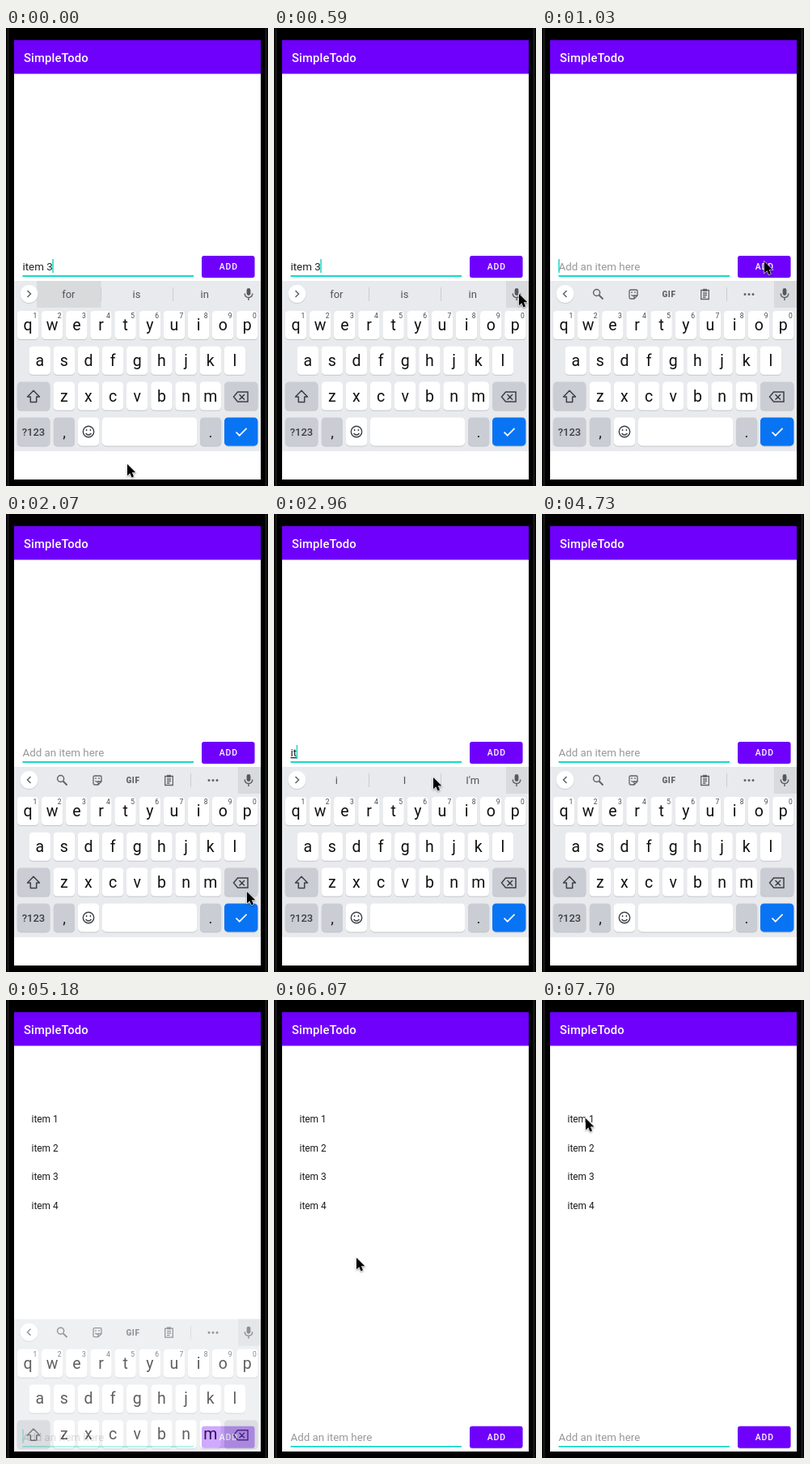
Write an HTML page that moves like this. It is 324 px wide and 565 px high and loops after 8000 ms.

```html
<!DOCTYPE html>
<html lang="en">
<head>
<meta charset="utf-8">
<title>SimpleTodo</title>
<style>
  html, body { margin: 0; width: 100%; height: 100%; overflow: hidden; background: #000; }
  svg { display: block; width: 324px; height: 565px; }
  text { font-family: Roboto, "Noto Sans", sans-serif; white-space: pre; }
  .mid { text-anchor: middle; }
  .icon { fill: none; stroke: #5f6368; stroke-width: 1.5; }
</style>
</head>
<body>
<svg viewBox="0 0 324 565">
  <defs><clipPath id="screen"><path d="M10 15H315V557H10Z"/></clipPath></defs>
  <path d="M0 0H324V565H0Z"/>
  <path d="M2.5 0V565M321.5 0V565" stroke="#1d1d1d" stroke-width="2"/>
  <g clip-path="url(#screen)">
    <path d="M10 15H315V557H10Z" fill="#fff"/>
    <path d="M10 15H315V56.5H10Z" fill="#6f00fc"/>
    <text x="22" y="42" font-size="14.8" font-weight="500" letter-spacing=".15" fill="#fff">SimpleTodo</text>
    <g id="list" font-size="11.87" fill="#1c1c1c"></g>

    <g id="entry">
      <text id="field" x="20.5" y="299" font-size="13.36"></text>
      <path d="M20.5 306H232" stroke="#14dac5" stroke-width="1.8"/>
      <path id="caret" d="M0 285V302" stroke="#14dac5" stroke-width="1.5"/>
      <rect x="242" y="281.6" width="65.5" height="27" rx="3" fill="#000" opacity=".2"/>
      <rect x="242" y="281" width="65.5" height="27" rx="3" fill="#6f00fc"/>
      <text x="275.3" y="298.3" class="mid" font-size="10.4" font-weight="500" letter-spacing=".9" fill="#fff">ADD</text>
    </g>

    <g id="keyboard">
      <path d="M10 312H315V522H10Z" fill="#e8eaed"/>
      <path d="M10 522H315V557H10Z" fill="#fff"/>
      <path id="hoverWord" d="M38 312H117.5V345H38Z" fill="#d8dadc"/>
      <path id="hoverMic" d="M287 312H315V345H287Z" fill="#d8dadd"/>
      <circle cx="28.5" cy="328.8" r="11.3" fill="#000" opacity=".12"/>
      <circle cx="28.5" cy="328" r="11" fill="#fff"/>
      <path id="chevron" class="icon" d="M-2 -4L2 0L-2 4"/>
      <g id="words">
        <path d="M117.5 320V337M206.5 320V337" stroke="#cbced2"/>
        <g id="wordText" class="mid" font-size="13" fill="#50545a"></g>
      </g>
      <g id="tools">
        <g class="icon">
          <circle cx="67.6" cy="326.5" r="4"/>
          <path d="M70.5 329.5L75.5 334.5" stroke-width="2"/>
          <path d="M110 323H116.5Q118 323 118 324.5V330L114 334H109.5Q108 334 108 332.5V324.5Q108 323 110 323ZM118 330H114V334M110.5 329Q112 331.5 114.5 329.5" stroke-width="1.3"/>
          <path d="M111 325.3V327M115 325.3V327" stroke-width="1.4"/>
          <path d="M196.7 323.5H206.3V334.5H196.7ZM199 327H204M199 329.5H204M199 332H202.5" stroke-width="1.3"/>
          <path d="M199 323.3H204" stroke-width="3"/>
          <path d="M228.5 320V337" stroke="#cbced2" stroke-width="1"/>
        </g>
        <text x="157" y="332" class="mid" font-size="10" font-weight="900" letter-spacing=".6" fill="#5f6368">GIF</text>
        <path d="M251 328.5h.01M256 328.5h.01M261 328.5h.01" stroke="#5f6368" stroke-width="3" stroke-linecap="round"/>
      </g>
      <rect x="297.6" y="321" width="4.8" height="9" rx="2.4" fill="#55595e"/>
      <path class="icon" d="M295.2 327.5Q295.4 332.5 300 332.5T304.8 327.5M300 332.5V336"/>
      <g id="keys"></g>
      <path class="icon" stroke-linejoin="round" d="M34 447.3L41.5 455H37.7V461.5H30.3V455H26.5Z" style="stroke:#3c4043"/>
      <path class="icon" d="M286.5 449H299V461H286.5L281.5 455ZM288.5 452L295 458.5M295 452L288.5 458.5" style="stroke:#3c4043"/>
      <g class="icon" style="stroke:#3c4043;stroke-width:1.4">
        <circle cx="102" cy="498" r="6.7"/>
        <path d="M99.6 495V497M104.4 495V497M98.5 500Q102 504 105.5 500"/>
      </g>
      <path d="M284.5 498.5L288.7 502.7L297.5 493.8" fill="none" stroke="#fff" stroke-width="1.7"/>
    </g>
  </g>
  <path id="mouse" d="M0 0V14.2L3.3 11.2L5.5 16.4L8 15.3L5.8 10.3H10.3Z" stroke="#fff" stroke-width="1.1" paint-order="stroke"
        style="filter:drop-shadow(0 1px 1px #0006)"/>
</svg>
<script>
const LOOP = 8000, TICK = 148;
const $ = id => document.getElementById(id);
const label = (x, y, s, more = "") => `<text x="${x}" y="${y}" ${more}>${s}</text>`;
const show = (id, on) => $(id).setAttribute("visibility", on ? "visible" : "hidden");
const move = (id, x, y) => $(id).setAttribute("transform", `translate(${x} ${y})`);

function key(x, y, w, fill = "#fff") {
  const box = (dy, c) => `<rect x="${x}" y="${y + dy}" width="${w}" height="35" rx="4.5" fill="${c}"/>`;
  return box(1, "#c3c6ca") + box(0, fill);
}

function buildKeys() {
  const rows = [["qwertyuiop", 27], ["asdfghjkl", 41.7], ["zxcvbnm", 71.8]];
  const gray = "#cacdd3";
  let out = "";
  rows.forEach(([letters, left], r) => [...letters].forEach((c, i) => {
    const x = left + i * 30.15, y = 349 + r * 43.8;
    out += key(x - 13.2, y, 26.4) + label(x, y + 24, c, 'class="mid" font-size="19.5" fill="#111"');
    if (!r) out += label(x + 9, y + 9.3, (i + 1) % 10, 'class="mid" font-size="8.5" fill="#44474b"');
  }));
  out += key(13.8, 436.6, 40.6, gray) + key(270, 436.6, 41.4, gray);
  const y = 480.4;
  out += key(13.8, y, 40.6, gray) + key(58.8, y, 26.2, gray) + key(89, y, 26.2)
    + key(119, y, 117, "#fff") + key(240, y, 26.2, gray) + key(270, y, 41.4, "#0874f4");
  out += label(34, 502.6, "?123", 'class="mid" font-size="13" font-weight="500" fill="#3c4043"');
  out += label(72, 505, ",", 'class="mid" font-size="19" fill="#222"');
  out += label(253, 505, ".", 'class="mid" font-size="19" fill="#222"');
  $("keys").innerHTML = out;
}

buildKeys();
$("list").innerHTML = [1, 2, 3, 4].map((n, i) => label(31.5, 151 + i * 35.6, "item " + n)).join("");

// Pointer waypoints: tick, x, y
const path = [
  [0, 150, 538], [1, 176, 520], [2, 240, 465], [3, 308, 395], [4, 303, 328], [6, 275, 288], [7, 275, 288],
  [8, 288, 380], [9, 297, 474], [12, 298, 466], [16, 298, 466], [18, 255, 405], [20, 197, 325], [23, 200, 322],
  [26, 275, 300], [27, 265, 295], [28, 265, 295], [31, 300, 40], [37, 245, 332], [38, 102, 318],
  [41, 102, 318], [48, 54, 146], [54, 54, 146]
];
const hiddenCaret = [[9, 12], [14, 16], [26, 28], [32, 35], [41, 44], [46, 48], [52, 54]];

function pointer(n) {
  const i = Math.max(1, path.findIndex(p => p[0] >= n));
  const [a, ax, ay] = path[i - 1], [b, bx, by] = path[i];
  const k = (n - a) / (b - a);
  return [ax + (bx - ax) * k, ay + (by - ay) * k];
}

function typed(n) {
  if (n < 6) return "item 3";
  if (n < 18 || n >= 28) return "";
  return "item 4".slice(0, n < 20 ? 1 : n - 18);
}

function suggestions(n) {
  if (n < 6 || (n >= 23 && n < 26)) return ["for", "is", "in"];
  return n >= 18 && n < 23 ? ["i", "I", "I'm"] : null;
}

function draw(n) {
  const text = typed(n), words = suggestions(n), closed = n >= 35;
  const field = $("field");
  field.textContent = text || "Add an item here";
  field.setAttribute("fill", text ? "#222" : "#989898");
  field.setAttribute("text-decoration", n >= 18 && n < 23 ? "underline" : "none");
  move("caret", text ? 20.8 + field.getComputedTextLength() : 21, 0);
  show("caret", !hiddenCaret.some(([a, b]) => n >= a && n < b));
  move("entry", 0, closed ? 244.8 : 0);
  show("list", closed);

  const slide = Math.max(0, n - 34) / 3;
  move("keyboard", 0, 245 * slide);
  $("keyboard").setAttribute("opacity", Math.max(0, 1 - slide));

  show("words", words);
  show("tools", !words);
  if (words) $("wordText").innerHTML = words.map((w, i) => label(77.3 + i * 84.2, 333, w)).join("");
  show("hoverWord", n < 4);
  show("hoverMic", n >= 4);
  $("chevron").setAttribute("transform", `translate(28.5 328) scale(${words ? 1 : -1} 1)`);

  move("mouse", ...pointer(n));
  show("mouse", n < 32 || n >= 37);
}

function frame(now) {
  draw(Math.floor((now % LOOP + 8) / TICK));
  requestAnimationFrame(frame);
}
requestAnimationFrame(frame);
</script>
</body>
</html>
```
